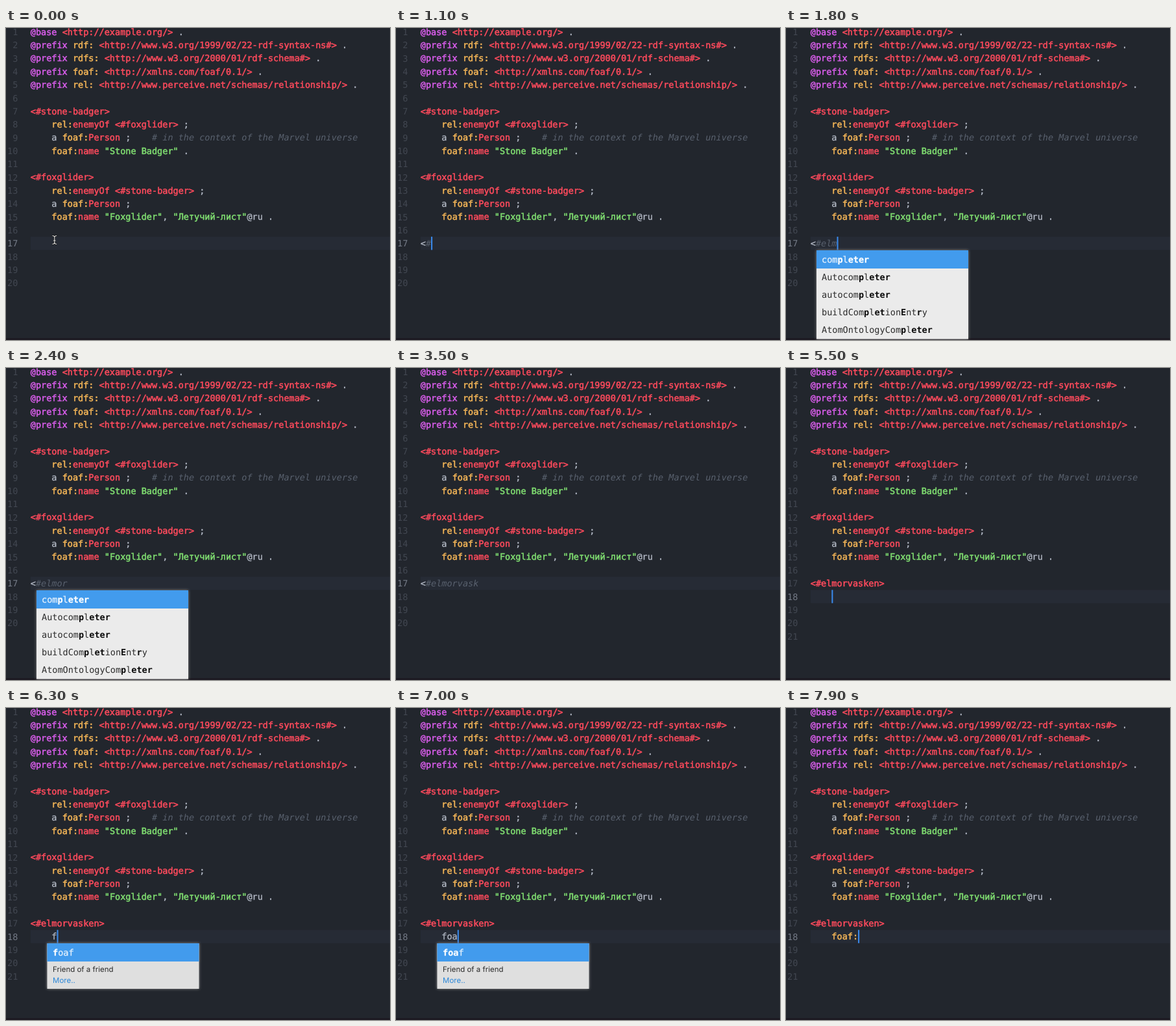
An HTML page that plays this animation: 592x480 px, repeating every 8 s.

```html
<!DOCTYPE html>
<html lang="en">
<head>
<meta charset="utf-8">
<title>Turtle editor</title>
<style>
  html, body { margin: 0; width: 100%; height: 100%; overflow: hidden; background: #22262d; }
  svg { display: block; }
  text {
    font: 13.53px "DejaVu Sans Mono", "Liberation Mono", monospace;
    white-space: pre; text-rendering: geometricPrecision; fill: #b4bac6;
  }
  .code { stroke: #b4bac6; stroke-width: .3px; }
  .code tspan { stroke-width: .55px; }
  .keyword { fill: #d65ce8; stroke: #d65ce8; }
  .iri, .local { fill: #fc4a5c; stroke: #fc4a5c; }
  .prefix { fill: #f2b457; stroke: #f2b457; }
  .string { fill: #7fdc70; stroke: #7fdc70; }
  .comment { fill: #59616e; stroke: none; font-style: italic; }
  .number { fill: #424751; text-anchor: end; }
  .number.active { fill: #747a86; }
  .popup { filter: drop-shadow(0 0 2px #8b8b8b); }
  .popup text { fill: #2b2b2b; }
  .popup .selected { fill: #e4f0fc; stroke: #e4f0fc; stroke-width: .3px; }
  .popup .match { font-weight: bold; fill: #0c0c0c; }
  .popup .selected .match { fill: #fff; }
  .popup .note { font: 11.5px Inter, "Liberation Sans", sans-serif; }
  .popup .link { fill: #2b87d8; }
</style>
</head>
<body>
<svg id="stage" width="592" height="480" viewBox="0 0 592 480"></svg>
<script>
const LOOP = 8000;
const LEFT = 37.8, CHAR = 8.145, PITCH = 20.33;
const stage = document.getElementById('stage');

const fixedLines = `@base <http://example.org/> .
@prefix rdf: <http://www.w3.org/1999/02/22-rdf-syntax-ns#> .
@prefix rdfs: <http://www.w3.org/2000/01/rdf-schema#> .
@prefix foaf: <http://xmlns.com/foaf/0.1/> .
@prefix rel: <http://www.perceive.net/schemas/relationship/> .

<#stone-badger>
    rel:enemyOf <#foxglider> ;
    a foaf:Person ;    # in the context of the Marvel universe
    foaf:name "Stone Badger" .

<#foxglider>
    rel:enemyOf <#stone-badger> ;
    a foaf:Person ;
    foaf:name "Foxglider", "Летучий-лист"@ru .`.split('\n');

// Keystrokes: [time, inserted text]
const keys = [
  [700, '<'], [1000, '#'],
  [1300, 'e'], [1500, 'l'], [1700, 'm'], [1850, 'o'], [2000, 'r'],
  [2600, 'v'], [2800, 'a'], [2950, 's'], [3100, 'k'],
  [3700, 'e'], [3900, 'n'], [4100, '>'],
  [4900, '\n'], [5400, '    '], [6200, 'f'],
  [6600, 'o'], [6900, 'a'], [7200, 'f'], [7600, ':']
];

// Brackets mark the fuzzily matched letters.
const completions = [
  'com[p]l[eter]', 'Autocom[p]l[eter]', 'autocom[p]l[eter]',
  'buildCom[p]l[et]ion[E]nt[r]y', 'AtomOntologyCom[p]l[eter]'
];

const escapeText = s => s.replace(/&/g, '&amp;').replace(/</g, '&lt;').replace(/>/g, '&gt;');
const span = (kind, s) => s ? `<tspan class="${kind}">${escapeText(s)}</tspan>` : '';
const rect = (x, y, w, h, fill) =>
  `<rect x="${x}" y="${y}" width="${w}" height="${h}" fill="${fill}"/>`;
const text = (x, y, body, kind = '') => `<text x="${x}" y="${y}" class="${kind}">${body}</text>`;
const rowCenter = n => 6 + PITCH * (n - 1);

function highlight(line) {
  const token = /(@base|@prefix)|(<[^>]*>)|("[^"]*")|(#.*)|(\w+:)(\w*)|([^])/g;
  return line.replace(token, (_, keyword, iri, string, comment, prefix, local, plain) =>
    span('keyword', keyword) + span('iri', iri) + span('string', string) +
    span('comment', comment) + span('prefix', prefix) + span('local', local) +
    escapeText(plain || ''));
}

function codeLine(line, n) {
  return text(LEFT, rowCenter(n) + 4.7, highlight(line), 'code');
}

function gutter(count, active) {
  return Array.from({ length: count }, (_, i) =>
    text(18.3, rowCenter(i + 1) + 4.9, i + 1, i + 1 === active ? 'number active' : 'number')).join('');
}

function option(label, x, y, selected) {
  const body = label.replace(/\[(.*?)\]/g, (_, s) => span('match', s));
  return text(x, y, body, selected ? 'selected' : '');
}

function completionPopup() {
  return '<g class="popup">' + rect(47, 342, 234, 136.5, '#ebebeb') +
    rect(47, 342, 234, 28, '#429bed') +
    completions.map((label, i) => option(label, 55, 361 + 27 * i, i === 0)).join('') + '</g>';
}

function prefixPopup(typed) {
  const label = `[${typed}]${'foaf'.slice(typed.length)}`;
  return '<g class="popup">' + rect(63.5, 362, 234, 70, '#dfdfdf') +
    rect(63.5, 362, 234, 28, '#429bed') + option(label, 72, 381, true) +
    text(72, 406.3, 'Friend of a friend', 'note') +
    text(72, 423, 'More..', 'note link') + '</g>';
}

function pointer() {
  const shape = 'M71.5 319.5q3 0 3.3 2.3q.3-2.3 3.3-2.3M74.8 321.8v8.4M71.5 332.5q3 0 3.3-2.3q.3 2.3 3.3 2.3M73 327h3.6';
  return `<path d="${shape}" fill="none" stroke="#111" stroke-width="2.4"/>` +
    `<path d="${shape}" fill="none" stroke="#e4e4e4" stroke-width="1.1"/>`;
}

const fixedCode = fixedLines.map((line, i) => codeLine(line, i + 1)).join('');

function render(t) {
  const pressed = keys.filter(([time]) => time <= t);
  const lines = pressed.map(key => key[1]).join('').split('\n');
  const active = 16 + lines.length;
  const current = lines[lines.length - 1];
  const lastKey = pressed.length ? pressed[pressed.length - 1][0] : -400;
  const cursorOn = (t - lastKey) % 800 < 400;
  const center = rowCenter(active);

  let picture = rect(0, 0, 592, 480, '#22262d') +
    rect(38, center - 10.2, 554, PITCH, '#262b35') +
    rect(0, 477, 592, 3, '#1d1a22') +
    gutter(19 + lines.length, active) + fixedCode +
    lines.map((line, i) => codeLine(line, 17 + i)).join('');

  if (cursorOn) {
    picture += rect(LEFT + current.length * CHAR, center - 10.2, 2, PITCH, '#3a8cf0');
  }
  if (t < 700) picture += pointer();
  if (t >= 1400 && t < 2600) picture += completionPopup();
  if (t >= 6300 && t < 7600) picture += prefixPopup(current.trim());
  return picture;
}

let shown = '';
function tick(now) {
  const picture = render(now % LOOP);
  if (picture !== shown) stage.innerHTML = shown = picture;
  requestAnimationFrame(tick);
}
tick(0);
</script>
</body>
</html>
```
